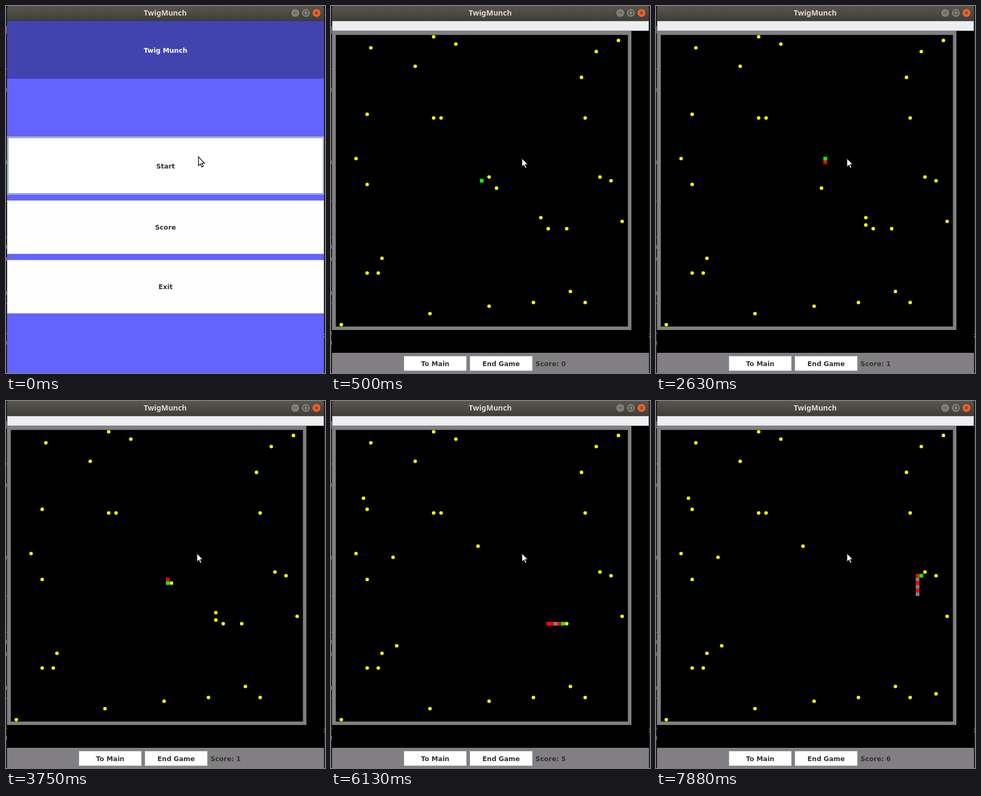
An HTML page with a canvas that plays this animation: 600 px wide and 691 px high, repeating every 8 s.

```html
<!DOCTYPE html>
<html lang="en">
<head>
<meta charset="utf-8">
<title>TwigMunch</title>
<style>
  html, body { margin: 0; width: 100%; height: 100%; overflow: hidden; background: #1c1a1c; }
  canvas { display: block; }
</style>
</head>
<body>
<canvas id="stage" width="600" height="691"></canvas>
<script>
const ctx = document.getElementById('stage').getContext('2d');

const LOOP = 8000, TICK = 125;
const GAME_AT = 500, MOVE_AT = 1710, MOVE_MS = 80;
const CELL = 6.95, LEFT = 2, TOP = 47.5;
const UI_FONT = 'bold 12.4px "DejaVu Sans", sans-serif';
const BAR_FONT = 'bold 14px "Noto Sans", "Open Sans", sans-serif';

const START_FOOD = [
  [27, 1], [10, 4], [33, 3], [22, 9], [77, 2], [71, 5], [67, 12], [9, 22],
  [27, 23], [29, 23], [68, 23], [6, 34], [9, 41], [42, 39], [44, 42],
  [72, 39], [75, 40], [56, 50], [58, 53], [63, 53], [78, 51], [13, 61],
  [9, 65], [12, 65], [64, 70], [26, 76], [42, 74], [54, 73], [68, 73], [2, 79]
];
const NEW_FOOD = [[56, 52], [39, 32], [17, 59], [16, 35], [8, 19], [75, 72]];
const ROUTE = 'U1 R5 U7 L2 D10 R13 D11 R14 U13 R1';
const DIRS = { U: [0, -1], D: [0, 1], L: [-1, 0], R: [1, 0] };

// Walk the route once, noting when each pellet appears and is eaten.
const path = [[40, 40]];
const meals = [];
const foods = START_FOOD.map(cell => ({ cell, born: 0, gone: Infinity }));

for (const leg of ROUTE.split(' ')) {
  const [dx, dy] = DIRS[leg[0]];
  for (let i = +leg.slice(1); i > 0; i--) {
    const [x, y] = path[path.length - 1];
    path.push([x + dx, y + dy]);
    const step = path.length - 1;
    const hit = foods.find(f => f.gone > step && f.cell[0] === x + dx && f.cell[1] === y + dy);
    if (!hit) continue;
    hit.gone = step;
    const cell = NEW_FOOD[meals.length];
    if (cell) foods.push({ cell, born: step, gone: Infinity });
    meals.push(step);
  }
}

function box(x, y, w, h, color) {
  ctx.fillStyle = color;
  ctx.fillRect(x, y, w, h);
}

function frame(x, y, w, h, color) {
  ctx.strokeStyle = color;
  ctx.lineWidth = 1;
  ctx.strokeRect(x + 0.5, y + 0.5, w - 1, h - 1);
}

function disc(x, y, r, color) {
  ctx.fillStyle = color;
  ctx.beginPath();
  ctx.arc(x, y, r, 0, Math.PI * 2);
  ctx.fill();
}

function label(text, x, y, color, font = UI_FONT, align = 'center') {
  ctx.font = font;
  ctx.textAlign = align;
  ctx.fillStyle = color;
  ctx.fillText(text, x, y);
}

function drawEdges() {
  box(0, 0, 600, 691, '#1c1a1c');
  for (const y of [41, 48, 158, 294, 453, 476, 540, 634]) box(0, y - 3, 1.5, 7, '#77777a');
  for (const y of [118, 367, 435, 559, 616]) box(0, y, 2, 1, '#8a8a8c');
  box(598, 617, 2, 1.5, '#8a8a8c');
  box(598, 622, 2, 1.5, '#8a8a8c');
}

function drawTitleBar() {
  const g = ctx.createLinearGradient(0, 0, 0, 27);
  g.addColorStop(0, '#58564e');
  g.addColorStop(1, '#403f39');
  ctx.fillStyle = g;
  ctx.beginPath();
  ctx.roundRect(2, -1, 596, 28, [5, 5, 0, 0]);
  ctx.fill();
  box(2, 27, 596, 1, '#33322e');
  label('TwigMunch', 299.5, 18, '#dfdbd2', BAR_FONT);

  for (const x of [544, 564, 584]) {
    disc(x, 13, 8.6, '#34332e');
    disc(x, 13, 7.8, x === 584 ? '#e9622f' : '#817e76');
  }
  ctx.strokeStyle = '#3b3a35';
  ctx.lineWidth = 1.2;
  ctx.beginPath();
  ctx.moveTo(540.5, 13); ctx.lineTo(547.5, 13);
  ctx.rect(560.5, 9.5, 7, 7);
  ctx.moveTo(581.3, 10.3); ctx.lineTo(586.7, 15.7);
  ctx.moveTo(586.7, 10.3); ctx.lineTo(581.3, 15.7);
  ctx.stroke();
}

function drawCursor(x, y) {
  const pts = [[0, 0], [0, 16.5], [3.8, 13.2], [6.3, 19], [9, 17.8], [6.5, 12.2], [11.3, 11.8]];
  ctx.beginPath();
  pts.forEach(([px, py]) => ctx.lineTo(x + px, y + py));
  ctx.closePath();
  ctx.fillStyle = '#fff';
  ctx.fill();
  ctx.strokeStyle = '#18181c';
  ctx.lineWidth = 1.4;
  ctx.stroke();
}

function menuButton(text, y, h) {
  box(2, y, 596, h, '#fffeff');
  frame(2, y, 596, h, '#cbd8f2');
  label(text, 300, y + h / 2 + 4.5, '#333');
}

function drawMenu(t) {
  box(2, 28, 596, 663, '#6363ff');
  box(2, 28, 596, 109, '#4343b0');
  label('Twig Munch', 300, 87.5, '#fff');

  const pressed = t >= 380;
  if (pressed) {
    box(2, 246, 596, 109, '#b7cde3');
    frame(2, 246, 596, 109, '#c3c8cf');
    box(3, 247, 594, 1.5, '#7b8794');
    box(3, 247, 1.5, 107, '#8996a5');
  } else {
    box(2, 246, 596, 109, '#d3dcec');
    box(3, 247, 594, 107, '#748aa3');
    box(4.5, 248.5, 591.5, 104, '#fff');
  }
  label('Start', 300, 305.5, '#333');
  menuButton('Score', 366, 101);
  menuButton('Exit', 478, 101);

  const k = Math.min(t / 250, 1);
  drawCursor(362 - 3 * k, 284 + 2.5 * k);
}

function cellBox([x, y], color) {
  box(LEFT + x * CELL, TOP + y * CELL, CELL, CELL, color);
}

function panelButton(text, x) {
  box(x, 659, 118, 28, '#fff');
  frame(x, 659, 118, 28, '#c4cfdd');
  label(text, x + 59, 678, '#333');
}

function drawGame(t) {
  const step = Math.min(Math.max(Math.floor((t - MOVE_AT) / MOVE_MS), 0), path.length - 1);
  const eaten = meals.filter(m => m <= step);

  box(2, 28, 596, 663, '#000');
  box(2, 28, 596, 19, '#eee');
  frame(2, 28, 596, 19, '#8ea3ba');
  box(2, 47, 563, 563, '#808080');
  box(9, 54.5, 549.5, 549, '#000');

  for (const f of foods) {
    if (step < f.born || step >= f.gone) continue;
    disc(LEFT + (f.cell[0] + 0.5) * CELL, TOP + (f.cell[1] + 0.5) * CELL, 3.3, '#ff0');
  }

  // A new segment waits where its pellet was until the tail gets there.
  eaten.forEach((meal, i) => {
    cellBox(path[Math.max(step - i - 1, meal)], i % 2 ? '#808080' : '#f00');
  });
  cellBox(path[step], '#0f0');

  box(2, 653, 596, 38, '#817f81');
  panelButton('To Main', 137);
  panelButton('End Game', 261);
  label('Score: ' + eaten.length, 384.5, 678, '#333', UI_FONT, 'left');

  drawCursor(359, 286.5);
}

// Hold each picture for one tick, with starts rounded to 10 ms.
function snap(t) {
  const start = i => Math.round(i * TICK / 10) * 10;
  const i = Math.floor(t / TICK);
  return start(t < start(i) ? i - 1 : i);
}

function draw(now) {
  const t = snap(now % LOOP);
  drawEdges();
  drawTitleBar();
  if (t < GAME_AT) drawMenu(t);
  else drawGame(t);
}

let begin = null;
function loop(now) {
  if (begin === null) begin = now;
  draw(Math.max(now - begin, 0));
  requestAnimationFrame(loop);
}
draw(0);
requestAnimationFrame(loop);
</script>
</body>
</html>
```
